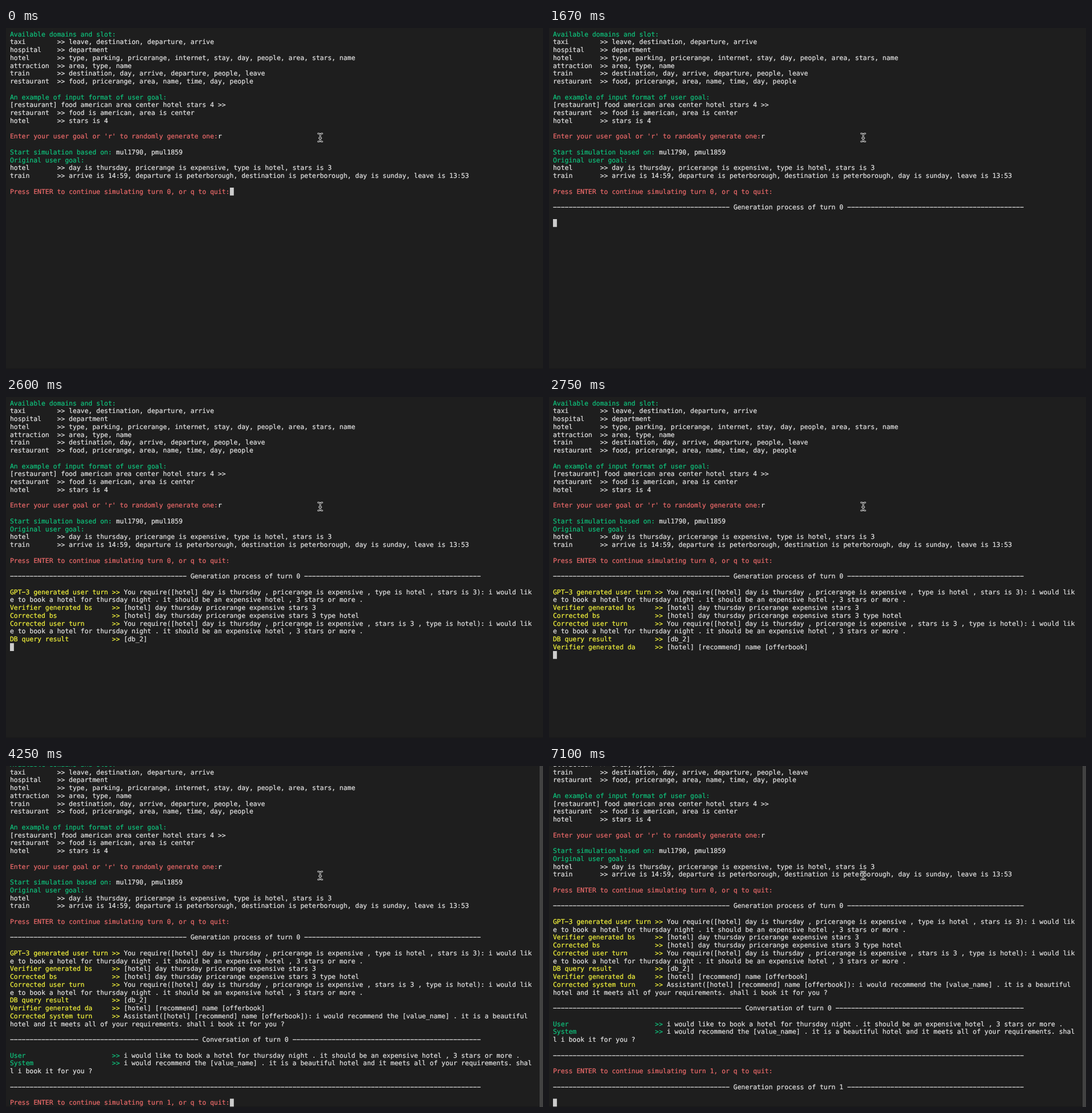
Animation of 940x596 px, one loop 8000 ms. Source, as an HTML page:

```html
<!DOCTYPE html>
<html lang="en">
<head>
<meta charset="utf-8">
<title>Dialogue simulation terminal</title>
<style>
  html, body { margin: 0; width: 100%; height: 100%; overflow: hidden; background: #1e1e1e; }
  svg { display: block; width: 940px; height: 596px; }
  text {
    font: 11.418px "DejaVu Sans Mono", monospace;
    white-space: pre;
    text-rendering: geometricPrecision;
    color: #e5e5e5;
  }
  tspan { fill: currentColor; stroke: currentColor; stroke-width: 0.22px; }
  .g { color: #0fc27c; }
  .r { color: #ec6a6a; }
  .y { color: #f5f53c; }
  .beam { fill: none; stroke-linecap: round; stroke-linejoin: round; }
</style>
</head>
<body>
<svg viewBox="0 0 940 596">
  <defs>
    <path id="beam" d="M546.5 184.5Q549.5 184.5 550 186.5Q550.5 184.5 553.5 184.5M550 186.5V196.5M546.5 198.5Q549.5 198.5 550 196.5Q550.5 198.5 553.5 198.5M548.2 192.5H551.8"/>
  </defs>
  <rect width="940" height="596" fill="#1e1e1e"/>
  <rect y="595" width="940" height="1" fill="#191919"/>
  <g id="screen"></g>
  <rect id="cursor" width="6.87" height="13.75" fill="#cccccc"/>
  <rect id="bar" x="934" width="6" height="596" fill="#424242"/>
  <use href="#beam" class="beam" stroke="#f2f2f2" stroke-width="2.7"/>
  <use href="#beam" class="beam" stroke="#111" stroke-width="1"/>
</svg>
<script>
const LOOP = 8000, LEFT = 7, TOP = 4, COL = 6.874, ROW = 13.75, BASELINE = 10.7, LAST_ROW = 42;
const NS = "http://www.w3.org/2000/svg";
const $ = id => document.getElementById(id);

const rule = title => {
  const side = "-".repeat((118 - title.length) / 2);
  return `${side} ${title} ${side}`;
};
const slot = (name, value) => `${name.padEnd(12)}>> ${value}`;
const field = (color, name, value) => `${color}|${name.padEnd(26)}>>| ${value}`;
const prompt = turn => `r|Press ENTER to continue simulating turn ${turn}, or q to quit:`;
const request = "e to book a hotel for thursday night . it should be an expensive hotel , 3 stars or more .";

// A line is plain text, or "color|colored part|plain part".
const lines = [
  "g|Available domains and slot:",
  slot("taxi", "leave, destination, departure, arrive"),
  slot("hospital", "department"),
  slot("hotel", "type, parking, pricerange, internet, stay, day, people, area, stars, name"),
  slot("attraction", "area, type, name"),
  slot("train", "destination, day, arrive, departure, people, leave"),
  slot("restaurant", "food, pricerange, area, name, time, day, people"),
  "",
  "g|An example of input format of user goal:",
  "[restaurant] food american area center hotel stars 4 >>",
  slot("restaurant", "food is american, area is center"),
  slot("hotel", "stars is 4"),
  "",
  "r|Enter your user goal or 'r' to randomly generate one:|r",
  "",
  "g|Start simulation based on:| mul1790, pmul1859",
  "g|Original user goal:",
  slot("hotel", "day is thursday, pricerange is expensive, type is hotel, stars is 3"),
  slot("train", "arrive is 14:59, departure is peterborough, destination is peterborough, day is sunday, leave is 13:53"),
  "",
  prompt(0),
  "",
  rule("Generation process of turn 0"),
  "",
  field("y", "GPT-3 generated user turn", "You require([hotel] day is thursday , pricerange is expensive , type is hotel , stars is 3): i would lik"),
  request,
  field("y", "Verifier generated bs", "[hotel] day thursday pricerange expensive stars 3"),
  field("y", "Corrected bs", "[hotel] day thursday pricerange expensive stars 3 type hotel"),
  field("y", "Corrected user turn", "You require([hotel] day is thursday , pricerange is expensive , stars is 3 , type is hotel): i would lik"),
  request,
  field("y", "DB query result", "[db_2]"),
  field("y", "Verifier generated da", "[hotel] [recommend] name [offerbook]"),
  field("y", "Corrected system turn", "Assistant([hotel] [recommend] name [offerbook]): i would recommend the [value_name] . it is a beautiful"),
  "hotel and it meets all of your requirements. shall i book it for you ?",
  "",
  rule("Conversation of turn 0"),
  "",
  field("g", "User", "i would like to book a hotel for thursday night . it should be an expensive hotel , 3 stars or more ."),
  field("g", "System", "i would recommend the [value_name] . it is a beautiful hotel and it meets all of your requirements. shal"),
  "l i book it for you ?",
  "",
  "-".repeat(120),
  "",
  prompt(1),
  "",
  rule("Generation process of turn 1")
];

// When the output grows, and where the cursor then stands.
const steps = [
  { at: 0, row: 20, col: 56 },
  { at: 500, row: 24, col: 0 },
  { at: 2450, row: 26, col: 0 },
  { at: 2600, row: 31, col: 0 },
  { at: 2750, row: 32, col: 0 },
  { at: 4250, row: 43, col: 56 },
  { at: 7100, row: 47, col: 0 }
];

function addLine(line, i) {
  const text = document.createElementNS(NS, "text");
  text.setAttribute("x", LEFT);
  text.setAttribute("y", TOP + i * ROW + BASELINE);
  const [color, tinted, plain = ""] = line.includes("|") ? line.split("|") : ["", "", line];
  for (const [cls, part] of [[color, tinted], ["", plain]]) {
    if (!part) continue;
    const span = document.createElementNS(NS, "tspan");
    if (cls) span.setAttribute("class", cls);
    span.textContent = part.replace(/-/g, "\u2212"); // wide terminal dash
    text.append(span);
  }
  $("screen").append(text);
  return text;
}

const rows = lines.map(addLine);
let shown = null;

function draw(time) {
  const step = steps.findLast(s => s.at <= time);
  if (step === shown) return;
  shown = step;
  const { row, col } = step;
  const scroll = Math.max(0, row - LAST_ROW);
  rows.forEach((el, i) => {
    el.style.display = i < row || (i === row && col) ? "" : "none";
  });
  // The invisible rotation keeps baselines from snapping to whole pixels.
  $("screen").setAttribute("transform", `translate(0 ${-scroll * ROW}) rotate(0.002)`);
  $("cursor").setAttribute("x", LEFT + col * COL);
  $("cursor").setAttribute("y", TOP + (row - scroll) * ROW);
  $("bar").style.display = scroll ? "" : "none";
}

const start = performance.now();
function tick() {
  draw((performance.now() - start) % LOOP);
  requestAnimationFrame(tick);
}
tick();
</script>
</body>
</html>
```
